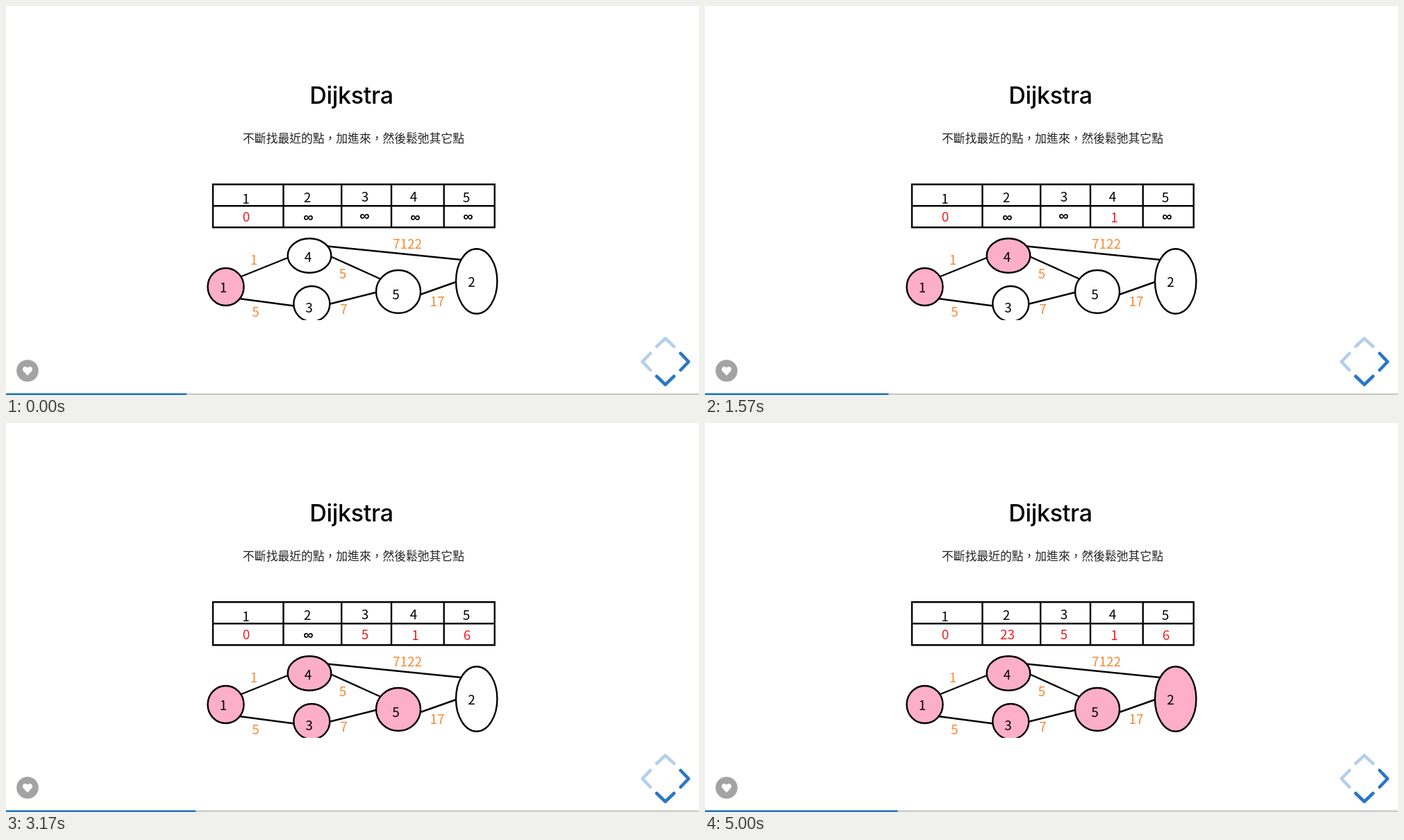
These frames come from a looping animation (998 px wide and 561 px high, 5.03 s). An HTML page:

```html
<!DOCTYPE html>
<html lang="zh-Hant">
<head>
<meta charset="utf-8">
<title>Dijkstra</title>
<style>
  html, body { margin: 0; width: 100%; height: 100%; overflow: hidden; background: #fff; }
  svg { display: block; width: 998px; height: 561px; }
  text { text-anchor: middle; }
  .title { font: 500 34px Inter, sans-serif; letter-spacing: -0.3px; }
  .lead { font: 300 16.8px "Noto Sans CJK TC", "Noto Sans CJK", sans-serif; fill: #222; }
  .num { font: 400 19px "Noto Sans CJK TC", "Noto Sans CJK", sans-serif; }
  .inf { font: 700 20px "Liberation Sans", sans-serif; }
  .line { fill: none; stroke: #000; stroke-width: 2.4; }
  .arrow { fill: none; stroke: #2a76c6; stroke-width: 4.6; stroke-linecap: round; stroke-linejoin: round; }
  .off { opacity: 0.35; }
</style>
</head>
<body>
<svg viewBox="0 0 998 561">
  <defs><clipPath id="crop"><rect x="280" y="240" width="440" height="213"/></clipPath></defs>
  <g id="slide">
    <text class="title" x="497.5" y="141">Dijkstra</text>
    <text class="lead" x="500.5" y="197">不斷找最近的點，加進來，然後鬆弛其它點</text>
    <path class="line" d="M298 257.3H703.7V319.3H298ZM298 288.2H703.7M399.5 257V319M483.2 257V319M555 257V319M630.7 257V319"/>
    <g id="graph" clip-path="url(#crop)"></g>
  </g>
  <circle cx="31" cy="526" r="15.8" fill="#a3a3a3"/>
  <path fill="#fff" d="M31 533L25 526.8C22.500 523.500 25 520 27.700 520C29.300 520 30.500 521 31 522C31.500 521 32.700 520 34.300 520C37 520 39.500 523.500 37 526.800Z"/>
  <path class="arrow off" d="M937 491L949.5 479.500L962 491M928 501L916.500 513L928 525"/>
  <path class="arrow" d="M971.500 501L983 513L971.500 525M937 534L949.500 546L962 534"/>
  <rect y="558.500" width="998" height="2.500" fill="#ccc"/>
  <rect id="bar" y="558.500" width="260" height="2.500" fill="#2076c0"/>
</svg>
<script>
const LOOP = 5030, STEP = 1000;
const RED = '#ed1c24', ORANGE = '#f58a35', PINK = '#fdaec8';
const byId = id => document.getElementById(id);
const slide = byId('slide'), graph = byId('graph'), bar = byId('bar');

function add(tag, attrs, label) {
  const el = document.createElementNS('http://www.w3.org/2000/svg', tag);
  for (const key in attrs) el.setAttribute(key, attrs[key]);
  if (label) el.textContent = label;
  graph.append(el);
  return el;
}
const num = (label, x, y, fill = '#000') => add('text', { class: 'num', x, y: y + 7, fill }, label);

// x1, y1, x2, y2, then weight and its centre
[
  [339, 390, 406, 363, '1', 357, 366],
  [336, 422, 415, 432.5, '5', 359.5, 441],
  [463, 346.5, 656, 366, '7122', 578, 343],
  [467, 361, 540, 394, '5', 485, 386],
  [465, 430, 533, 413, '7', 486.5, 437],
  [597, 416, 648, 398, '17', 621, 426]
].forEach(([x1, y1, x2, y2, weight, x, y]) => {
  add('line', { class: 'line', x1, y1, x2, y2 });
  num(weight, x, y, ORANGE);
});

// name, step when reached, ellipse, label centre
const nodes = [
  ['1', 0, 316.5, 405, 26, 27, 313, 406],
  ['4', 1, 437, 360, 31.3, 24.7, 435, 362],
  ['3', 2, 440.3, 429.5, 26, 25.5, 436.5, 434.5],
  ['5', 3, 565, 412, 32, 31, 561.5, 416],
  ['2', 4, 677.7, 397, 29.7, 46.8, 670.5, 398]
].map(([name, step, cx, cy, rx, ry, x, y]) => {
  const el = add('ellipse', { class: 'line', cx, cy, rx, ry });
  num(name, x, y);
  return { el, step };
});

// column heading and its centre, step, distance and its centre, infinity centre
const cells = [
  ['1', 345.5, 278, 0, '0', 346, 304, 346, 304],
  ['2', 434, 276, 4, '23', 435.5, 304, 435.5, 304.5],
  ['3', 517, 275, 2, '5', 517, 304, 516.5, 302.5],
  ['4', 587, 275, 1, '1', 589.5, 305, 589.5, 304.5],
  ['5', 663, 276, 3, '6', 664, 305, 665.5, 304]
].map(([head, hx, hy, step, dist, x, y, ix, iy]) => {
  num(head, hx, hy);
  const known = num(dist, x, y, RED);
  const unknown = add('text', { class: 'inf', x: ix, y: iy + 6 }, '∞');
  return { step, known, unknown };
});

function show(step) {
  for (const n of nodes) n.el.style.fill = step >= n.step ? PINK : '#fff';
  for (const c of cells) {
    const found = step >= c.step;
    c.known.style.display = found ? '' : 'none';
    c.unknown.style.display = found ? 'none' : '';
  }
  slide.setAttribute('transform', `translate(0 ${step >= 3 ? 1 : 0})`);
  bar.setAttribute('width', 260 + 4.35 * step);
}

const start = performance.now();
function tick() {
  const t = (performance.now() - start) % LOOP;
  show(Math.min(4, Math.floor(t / STEP)));
  requestAnimationFrame(tick);
}
tick();
</script>
</body>
</html>
```
